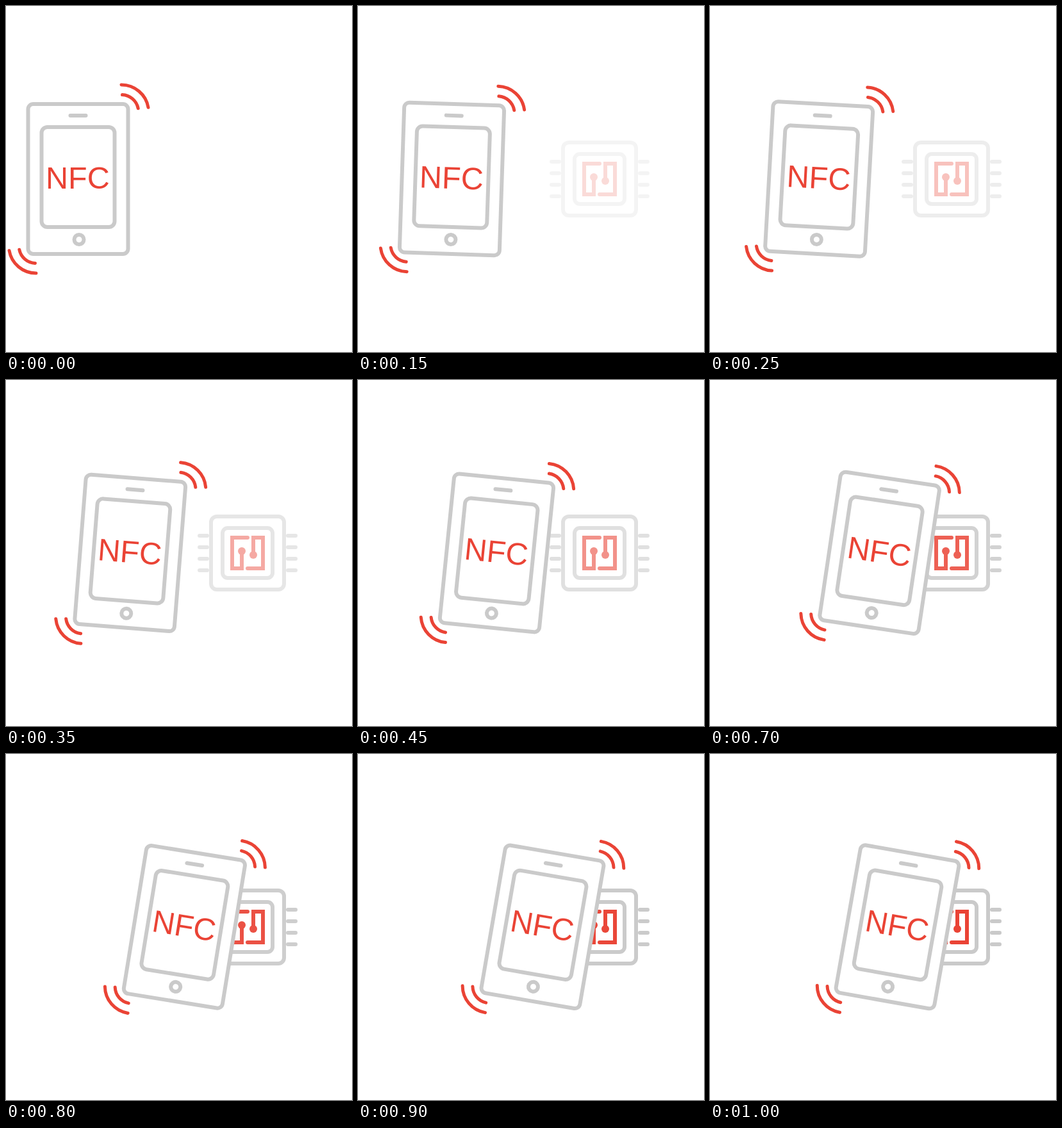
Write an HTML page that moves like this. It is 540 px wide and 540 px high and loops after 1.5 s.

```html
<!DOCTYPE html>
<html lang="en">
<head>
<meta charset="utf-8">
<title>NFC phone and chip</title>
<style>
  html, body { margin: 0; width: 100%; height: 100%; overflow: hidden; background: #fff; }
  svg { display: block; width: 100%; height: 100%; }
  .gray, .red { fill: none; stroke-width: 6; stroke-linecap: round; }
  .gray { stroke: #cacaca; }
  .red { stroke: #ea4335; }
  .waves { stroke-width: 5; }
  .dot, text { fill: #ea4335; }
  text { font: 48.5px "Liberation Sans", Arial, sans-serif; }
</style>
</head>
<body>
<svg viewBox="0 0 540 540">
  <defs>
    <path id="waves" d="M180 123A42.5 42.5 0 0 1 222 158.3M181.5 138.5A26.5 26.5 0 0 1 206.2 159.7"/>
    <path id="pins" d="M302 243h12m-12 18h12m-12 18h12m-12 18h12"/>
    <g id="trace">
      <path class="red" d="M377 246H353V294H368V267"/>
      <circle class="dot" cx="368" cy="267" r="6"/>
    </g>
  </defs>
  <g id="chip" opacity="0">
    <g class="gray">
      <rect x="320" y="213" width="114" height="114" rx="9"/>
      <rect x="338" y="231" width="78" height="78" rx="8"/>
      <use href="#pins"/>
      <use href="#pins" x="138"/>
    </g>
    <use href="#trace"/>
    <use href="#trace" transform="rotate(180 377 270)"/>
  </g>
  <g id="phone">
    <g class="gray">
      <rect x="34.5" y="153" width="156" height="234" rx="8" fill="#fff"/>
      <rect x="55.5" y="189" width="114" height="156" rx="9"/>
      <path d="M100.5 171h24"/>
      <circle cx="114" cy="364.5" r="7.5"/>
    </g>
    <g class="red waves">
      <use href="#waves"/>
      <use href="#waves" transform="rotate(180 113.5 270)"/>
    </g>
    <text x="62" y="285">NFC</text>
  </g>
</svg>
<script>
  const LOOP = 1500, MOVE = 1000, STEP = 50;
  const phone = document.getElementById('phone');
  const chip = document.getElementById('chip');

  // Cubic from 0 to 1 with start speed 1.2 and end speed 0.1
  const ease = t => 1.2 * t * (1 - t) ** 2 + t * t * (3 - 2 * t) + 0.1 * t * t * (t - 1);

  const start = performance.now();
  function draw() {
    const ms = (performance.now() - start) % LOOP;
    const p = ease(Math.min(1, Math.floor(ms / STEP) * STEP / MOVE));
    phone.setAttribute('transform', `translate(${180 * p} 0) rotate(${10 * p} 113.5 270)`);
    chip.setAttribute('opacity', p);
    requestAnimationFrame(draw);
  }
  draw();
</script>
</body>
</html>
```
